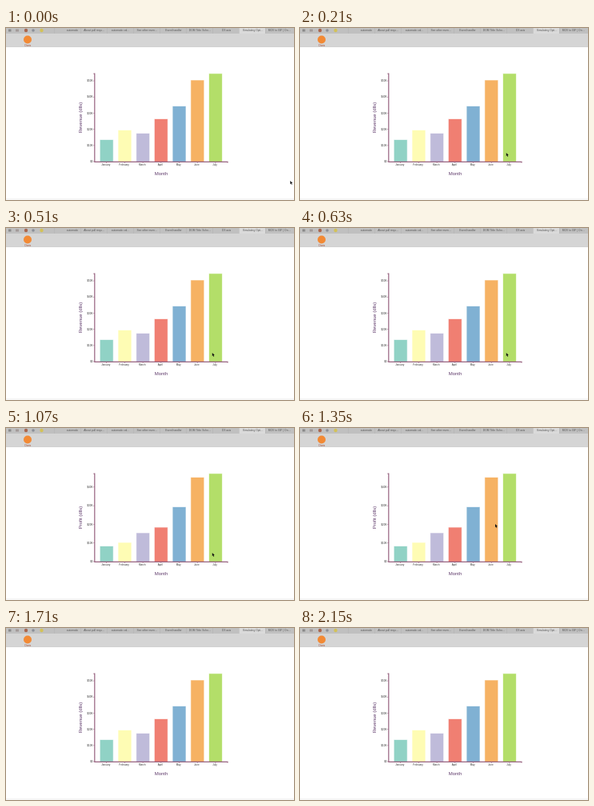
Recreate the animation shown at these times as an HTML page. Size 360 by 215 pixels, loop 2410 ms.

```html
<!DOCTYPE html>
<html lang="en">
<head>
<meta charset="utf-8">
<title>Bar chart toggle</title>
<style>
html, body { margin: 0; width: 100%; height: 100%; overflow: hidden; background: #fff; }
svg { display: block; width: 100vw; height: 100vh; font-family: "Liberation Sans", Arial, sans-serif; }
.tabs { font-size: 3.3px; fill: #555; text-anchor: middle; }
.small { font-size: 3.1px; fill: #333; }
.title { font-size: 6px; fill: #5f3a6b; text-anchor: middle; }
.axis { stroke: #97627f; stroke-width: 1.2; fill: none; }
</style>
</head>
<body>
<svg id="stage" viewBox="0 0 360 215">
  <rect width="360" height="8" fill="#c0c0c0"/>
  <rect y="7" width="360" height="16.5" fill="#d5d5d5"/>
  <rect y="23" width="360" height=".6" fill="#c4c4c4"/>
  <rect x="291" width="33" height="7" fill="#dadada"/>
  <g id="tabs" class="tabs"></g>
  <rect x="3" y="1.5" width="3.5" height="3" fill="#8a8a8a"/>
  <rect x="12" y="1.5" width="4" height="3" fill="#a39a99"/>
  <circle cx="25" cy="3" r="2.2" fill="#a8664f"/>
  <circle cx="34" cy="3" r="1.8" fill="#8b8f98"/>
  <circle cx="44.5" cy="3" r="2.2" fill="#d3c257"/>
  <circle cx="27" cy="14.5" r="5" fill="#f28a35"/>
  <text x="27" y="22.8" class="tabs" style="font-size:2.8px;fill:#a34d35">Charts</text>
  <rect y="213.5" width="360" height=".8" fill="#e9e9e9"/>
  <g id="bars" stroke-opacity=".35"></g>
  <path class="axis" d="M109.5 57.2H110.8V167.4H277V168.6"/>
  <g id="months" class="small" text-anchor="middle"></g>
  <g id="ticks" class="small" text-anchor="end"></g>
  <text id="label" class="title" transform="translate(95 112) rotate(-90)"></text>
  <text class="title" x="194" y="184">Month</text>
  <path id="cursor" d="M0 0V4.2L1 3.3L1.7 4.9L2.4 4.6L1.7 3.1H3Z" fill="#111"/>
</svg>
<script>
const $ = id => document.getElementById(id);
const add = (parent, tag, attrs, text = "") => {
  const el = document.createElementNS("http://www.w3.org/2000/svg", tag);
  for (const k in attrs) el.setAttribute(k, attrs[k]);
  el.textContent = text;
  return parent.appendChild(el);
};

const LOOP = 2410, BASE = 167;
const views = [
  { label: "Revenue (dlls)", tops: [140, 128, 132, 114, 98, 65.5, 57.3], step: 20.2, count: 6 },
  { label: "Profit (dlls)", tops: [148, 143.5, 131.5, 124.5, 99, 62, 57.3], step: 23.3, count: 5 }
];
const colors = ["#90d2c5", "#fefcb4", "#bfbbda", "#f07f72", "#80b1d3", "#f6b263", "#b3de69"];
const months = ["January", "February", "March", "April", "May", "June", "July"];
const tabs = ["automatic", "About pull requ…", "automatic cal…", "See other even…", "Event handler",
  "DOM Title: Scho…", "D3 axis", "Simulating Opti…", "MOV to GIF | On…"];

// start time, x, y of the pointer tip
const pointer = [
  [0, 355.3, 191], [70, 322, 180], [140, 280, 164], [210, 257.8, 156],
  [1280, 256, 150], [1350, 244, 120], [1430, 226, 80], [1500, 210, 42],
  [1570, 200, 17.5], [1640, 196, -10]
];

tabs.forEach((name, i) => {
  add($("tabs"), "text", { x: i ? 77 + 33.1 * i : 83, y: 4.3 }, name);
  add($("tabs"), "rect", { x: 60 + 33 * i, y: 0, width: .4, height: 7, fill: "#acacac" });
});

const bars = months.map((name, i) => {
  const x = 117.8 + 22.7 * i;
  add($("months"), "text", { x: x + 7, y: 172.2 }, name);
  add($("months"), "rect", { x: x + 7.6, y: 168, width: .6, height: 1, fill: "#97627f" });
  return add($("bars"), "rect", { x, width: 15.9, fill: colors[i], stroke: colors[i] });
});

let shown;
function show(view) {
  if (view === shown) return;
  shown = view;
  $("label").textContent = view.label;
  bars.forEach((bar, i) => {
    bar.setAttribute("y", view.tops[i]);
    bar.setAttribute("height", BASE - view.tops[i]);
  });
  $("ticks").replaceChildren();
  for (let i = 0; i < view.count; i++) {
    const y = BASE - view.step * i;
    add($("ticks"), "text", { x: 108.6, y: y + 1.1 }, i ? `$${i}0K` : "$0");
    add($("ticks"), "rect", { x: 109.2, y: y - .3, width: 1.6, height: .6, fill: "#97627f" });
  }
}

function draw(now) {
  const t = now % LOOP;
  const profit = t >= 1070 && t < 1710 || t >= 2070 && t < 2150;
  show(views[+profit]);
  const [, x, y] = pointer.findLast(p => p[0] <= t);
  $("cursor").setAttribute("transform", `translate(${x} ${y})`);
}

const start = performance.now();
function tick() {
  draw(performance.now() - start);
  requestAnimationFrame(tick);
}
tick();
</script>
</body>
</html>
```
